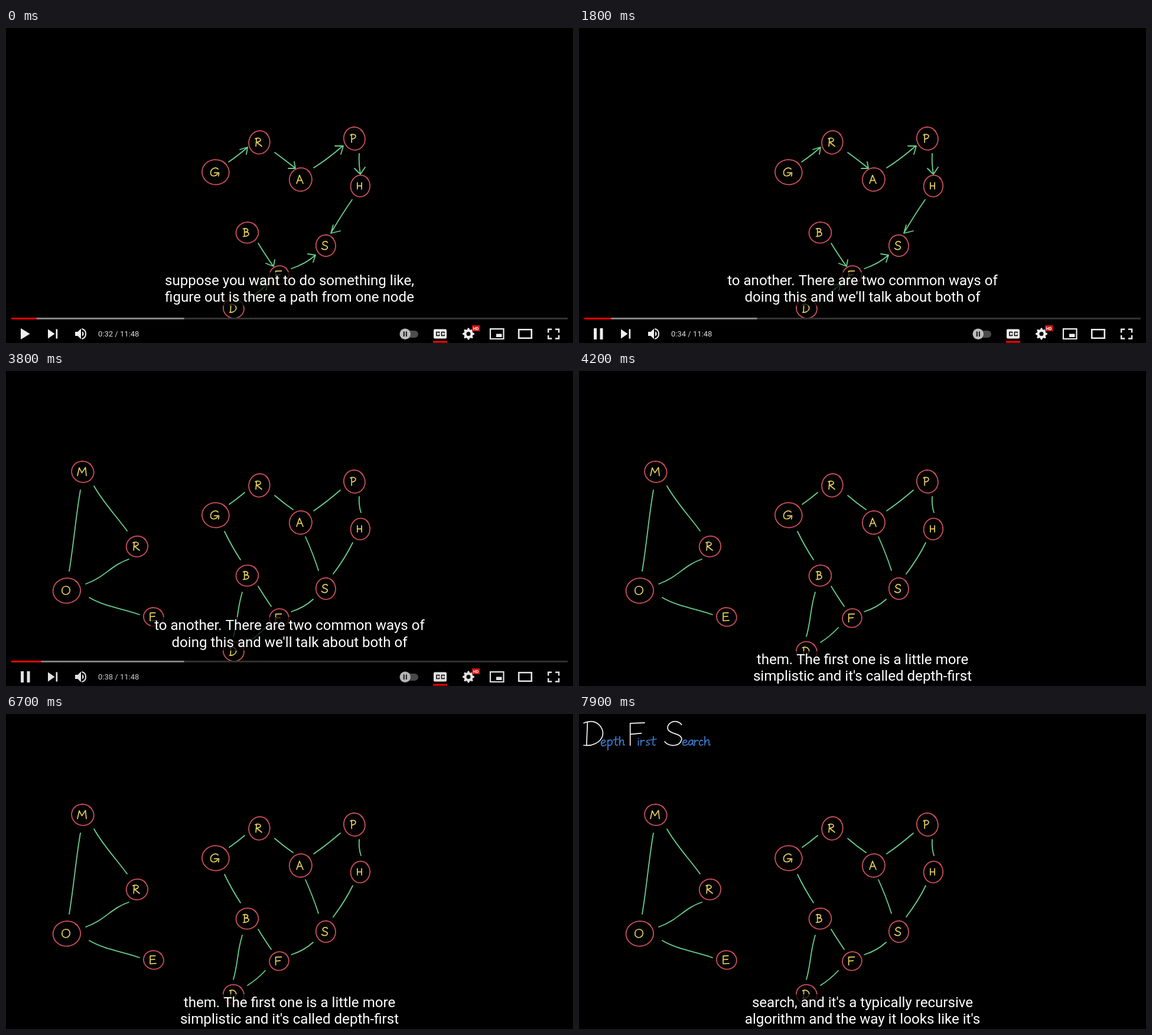
Write an HTML page with a canvas that moves like this. It is 960 px wide and 534 px high and loops after 8 s.

```html
<!DOCTYPE html>
<html lang="en">
<head>
<meta charset="utf-8">
<title>Graph search lesson</title>
<style>
html, body { margin: 0; width: 100%; height: 100%; overflow: hidden; background: #000; }
canvas { display: block; }
</style>
</head>
<body>
<canvas id="stage" width="960" height="534"></canvas>
<script>
const ctx = document.getElementById('stage').getContext('2d');
const LOOP = 8000;
const RED = '#cb4f5b', GREEN = '#69cf8b', YELLOW = '#e8d35a', BLUE = '#3b7fd4';
const clamp = v => Math.max(0, Math.min(1, v));

// Pen strokes of each letter in a 10 by 10 box
const GLYPHS = {
  A: 'M0 10L4.5 0L10 10M2 6.5L8 6.2',
  B: 'M2 0L2 10M0 .6C8 -1 10 4 3 4.6C11 4 11 10 0 10',
  D: 'M2 .5L1.5 10M0 .8C7 -1.5 11 3 10 6C9 9 4 10.5 0 10',
  E: 'M9 .2L1 .5L1 10L10 9.5M1 5L8 4.6',
  F: 'M10 .2L1 .5L1 10M1 5.2L8 4.8',
  G: 'M9 1.5C6 -1.5 0 1 0 6C0 11 7 11 8.5 6.5M4.5 6L10 6L9.5 10',
  H: 'M1 0L1 10M9 0L9 10M1 5.2L9 4.8',
  M: 'M0 10L2 .5L5 6.5L9 0L10 10',
  O: 'M5 0C-1 0 -1.5 9.5 4.5 10C11 10 12 0 5 0',
  P: 'M2 0L2 10M0 1C8 -2 13 4.5 2 6',
  R: 'M2 0L1 10M0 .8C9 -2 12 4.5 2 5L10 10',
  S: 'M9 1.5C6 -1.5 0 1 2 3.8C4 5.5 9 5.2 9 7.5C8 11 2 10.5 0 8.5',
  a: 'M9 1C4 -2 0 4 1 8C3 12 8 8 9 1C8 6 8 9 10 10',
  c: 'M9 1.5C5 -2 0 3 1 7C2 11 7 10 10 8.5',
  e: 'M1 5.5C12 5 8 -1.5 4 .5C-1 3 0 11 5 10C8 9.7 9 9 10 8',
  h: 'M1 0L1 10M1 8C3 3 9 3 8 6L8 9C8 10 9 10 10 9.5',
  i: 'M5 2L5 10M5 -2L5 -1.4',
  p: 'M1 0L1 10M1 2C3 -1 10 -.5 9 2.5C8 5.5 4 6 1 5',
  r: 'M1 0L1 10M1 5C3 1 7 -.5 10 1.5',
  s: 'M9 .5C4 -.5 0 3 4 4.5C12 7 9 10 1 9.5',
  t: 'M5 0L4 8C4 10 6 10.5 8 9.5M0 4L10 3'
};

// letter, centre x, centre y, radius x, radius y
const HALF_ONE = [
  ['G', 355, 244.5, 22.6, 21.5], ['R', 429, 194, 18, 19.5], ['A', 499, 257, 19.5, 19.3],
  ['P', 590, 187.5, 18, 19.5], ['H', 600, 268, 16.6, 18], ['S', 541.5, 369, 16.4, 18.5],
  ['B', 408.5, 347, 18.7, 18], ['F', 462.5, 419, 16.5, 15.7], ['D', 385.5, 475.5, 17.6, 16.5]
];
const HALF_TWO = [
  ['M', 130, 171, 19, 17.8], ['R', 222, 297.5, 18, 17.8],
  ['O', 103, 372.5, 23, 21.5], ['E', 250, 417, 17, 15.7]
];

const ARROWS = [
  'M377 227Q392 217 408 203M396 206L409 202L407 214',
  'M455 211Q470 222 489 237M488 227L490 238L478 238',
  'M521 237Q545 222 570 200M557 200L571 200L567 214',
  'M598 213Q597 231 600 247M590 238L600 248L608 236',
  'M586 291Q570 314 551 346M554 334L550 348L566 344',
  'M427 365Q436 380 452 403M455 393L453 404L440 399',
  'M483 408Q507 400 524 385M511 383L524 385L520 397',
  'M409 460Q425 450 442 435M430 436L443 434L440 445'
];
const EDGES = [
  'M378 226Q391 217 404 206', 'M455 211Q470 224 486 235', 'M521 237Q543 222 566 202',
  'M598 213Q597 228 601 240', 'M587 291Q575 316 554 344', 'M507 281Q520 310 529 338',
  'M370 272Q382 297 397 320', 'M427 365Q436 380 449 399', 'M400 375C391 405 393 422 385 450',
  'M483 408Q505 401 520 387', 'M409 460Q425 450 439 435', 'M126 202C119 240 114 298 107 339',
  'M149 195C164 222 186 245 205 271', 'M208 319C178 329 167 350 135 361',
  'M141 384C166 399 198 403 226 413'
];

// letter, x, y, width, height, colour
const W = '#f4f4f4';
const TITLE = [
  ['D', 8, 12, 32, 41, W], ['e', 37, 44, 9, 10, BLUE], ['p', 48, 44, 9, 17, BLUE],
  ['t', 58, 38, 9, 15, BLUE], ['h', 68, 38, 9, 15, BLUE],
  ['F', 84, 14, 27, 39, W], ['i', 97, 43, 7, 10, BLUE], ['r', 104, 44, 7, 9, BLUE],
  ['s', 113, 44, 7, 9, BLUE], ['t', 121, 38, 10, 15, BLUE],
  ['S', 145, 12, 32, 41, W], ['e', 175, 44, 9, 9, BLUE], ['a', 185, 44, 9, 9, BLUE],
  ['r', 195, 44, 7, 9, BLUE], ['c', 203, 44, 7, 9, BLUE], ['h', 212, 38, 10, 15, BLUE]
];

const CAPTIONS = [
  [0, 'suppose you want to do something like,', 'figure out is there a path from one node'],
  [1700, 'to another. There are two common ways of', "doing this and we'll talk about both of"],
  [4200, 'them. The first one is a little more', "simplistic and it's called depth-first"],
  [7100, "search, and it's a typically recursive", "algorithm and the way it looks like it's"]
];

function stroke(path, color, width) {
  ctx.strokeStyle = color;
  ctx.lineWidth = width;
  ctx.stroke(path);
}

function glyph(ch, x, y, w, h, color, width = 1.7) {
  const path = new Path2D();
  path.addPath(new Path2D(GLYPHS[ch]), new DOMMatrix([w / 10, 0, 0, h / 10, x, y]));
  stroke(path, color, width);
}

function node([ch, x, y, rx, ry]) {
  const path = new Path2D(), seed = x * 0.37;
  for (let i = 0; i <= 64; i++) {
    const a = i / 64 * 6.5, k = 0.985 + 0.02 * Math.sin(2 * a + seed) + 0.004 * a;
    path.lineTo(x + rx * k * Math.cos(a - 0.9), y + ry * k * Math.sin(a - 0.9));
  }
  stroke(path, RED, 1.8);
  const w = ch === 'M' ? 15 : ch === 'G' || ch === 'O' ? 14 : ch === 'H' ? 9 : 11;
  const h = ch === 'H' ? 11 : 14;
  glyph(ch, x - 1.5 - w / 2, y - 0.5 - h / 2, w, h, YELLOW);
}

function graph(t) {
  const full = t >= 2200;
  for (const d of full ? EDGES : ARROWS) stroke(new Path2D(d), GREEN, 1.8);
  HALF_ONE.forEach(node);
  if (full) HALF_TWO.forEach(node);
}

function title(t) {
  const count = Math.ceil(clamp((t - 6800) / 600) * TITLE.length);
  for (const [ch, x, y, w, h, color] of TITLE.slice(0, count)) glyph(ch, x, y, w, h, color);
}

function caption(t, drop) {
  const lines = CAPTIONS.filter(c => c[0] <= t).pop().slice(1);
  ctx.font = '24.1px Roboto, sans-serif';
  ctx.textAlign = 'center';
  lines.forEach((line, i) => {
    const y = 436 + i * 28.4 + drop, w = ctx.measureText(line).width + 12;
    ctx.fillStyle = 'rgba(0,0,0,.75)';
    ctx.fillRect(480 - w / 2, y - 22, w, 28.4);
    ctx.fillStyle = '#fff';
    ctx.fillText(line, 480, y);
  });
}

function rect(x, y, w, h, color) {
  ctx.fillStyle = color;
  ctx.fillRect(x, y, w, h);
}

function fill(d, color) {
  ctx.fillStyle = color;
  ctx.fill(new Path2D(d), 'evenodd');
}

function pill(x, y, w, h, r, color) {
  ctx.fillStyle = color;
  ctx.beginPath();
  ctx.roundRect(x, y, w, h, r);
  ctx.fill();
}

function label(text, x, y, font, color) {
  ctx.font = font + ' Roboto, sans-serif';
  ctx.fillStyle = color;
  ctx.fillText(text, x, y);
}

function gear(x, y) {
  ctx.beginPath();
  for (let i = 0; i < 32; i++) {
    const a = (i - 0.5) / 32 * 2 * Math.PI, r = i % 4 < 2 ? 10 : 7.6;
    ctx.lineTo(x + r * Math.cos(a), y + r * Math.sin(a));
  }
  ctx.closePath();
  ctx.moveTo(x + 3.5, y);
  ctx.arc(x, y, 3.5, 0, 2 * Math.PI);
  ctx.fillStyle = '#eee';
  ctx.fill('evenodd');
}

function controls(t, alpha) {
  const sec = 32 + Math.max(0, t - 800) / 500;
  const white = '#eee';
  ctx.save();
  ctx.globalAlpha = alpha;
  ctx.textAlign = 'left';

  rect(9, 491, 942, 3, '#333');
  rect(9, 491, 292.5, 3, '#858585');
  rect(9, 491, 942 * sec / 708, 3, '#f00');

  if (t < 800) fill('M25 509L40.5 518.5L25 528Z', white);
  else fill('M25 509h5v19h-5ZM35.5 509h5v19h-5Z', white);
  fill('M71 510.5L82.5 518.5L71 526.5ZM84.5 510.5h2.7v16h-2.7Z', white);
  fill('M117 515h4.5l5.5-5.5v18l-5.5-5.5h-4.5Z', white);
  fill('M129 514.2Q131.7 515.6 131.7 518.5T129 522.8Z', white);
  stroke(new Path2D('M129 510.3C137 512.5 137 524.5 129 526.7'), white, 2);
  label(`0:${Math.floor(sec)} / 11:48`, 156, 522.5, '13px', '#ddd');

  pill(668, 513, 30, 12, 6, '#4c4c4c');
  pill(666.5, 509.5, 18.5, 18.5, 9.25, '#bdbdbd');
  rect(672.7, 514.5, 2.2, 8.5, '#222');
  rect(676.8, 514.5, 2.2, 8.5, '#222');

  pill(724, 510.5, 22, 16, 2, white);
  for (const x of [728.5, 737])
    stroke(new Path2D(`M${x + 5} 517v-1.5h-4.5v6h4.5v-1.5`), '#000', 1.6);
  rect(723, 530.5, 24, 3, '#f00');

  gear(783, 518.5);
  pill(789, 504, 13.5, 10, 1, '#d31414');
  label('HD', 790.8, 511.8, 'bold 7px', '#fff');

  ctx.lineJoin = 'miter';
  stroke(new Path2D('M820 510.2h22.5v16.8h-22.5Z'), white, 2.2);
  rect(830, 518.5, 9.5, 5.5, white);
  stroke(new Path2D('M868.2 511.2h21.6v14.6h-21.6Z'), white, 2.6);
  ctx.lineCap = 'butt';
  stroke(new Path2D('M918.2 516.5v-5.8h6M930 510.7h6v5.8M936 520.8v5.8h-6M924.2 526.6h-6v-5.8'), white, 2.5);
  ctx.restore();
}

function draw(t) {
  const hide = Math.pow(clamp((t - 3765) / 200), 1.7);
  rect(0, 0, 960, 534, '#000');
  ctx.lineCap = ctx.lineJoin = 'round';
  graph(t);
  title(t);
  if (hide < 1) controls(t, 1 - hide);
  caption(t, 61 * hide);
}

const start = performance.now();
function tick() {
  draw((performance.now() - start) % LOOP);
  requestAnimationFrame(tick);
}
tick();
</script>
</body>
</html>
```
